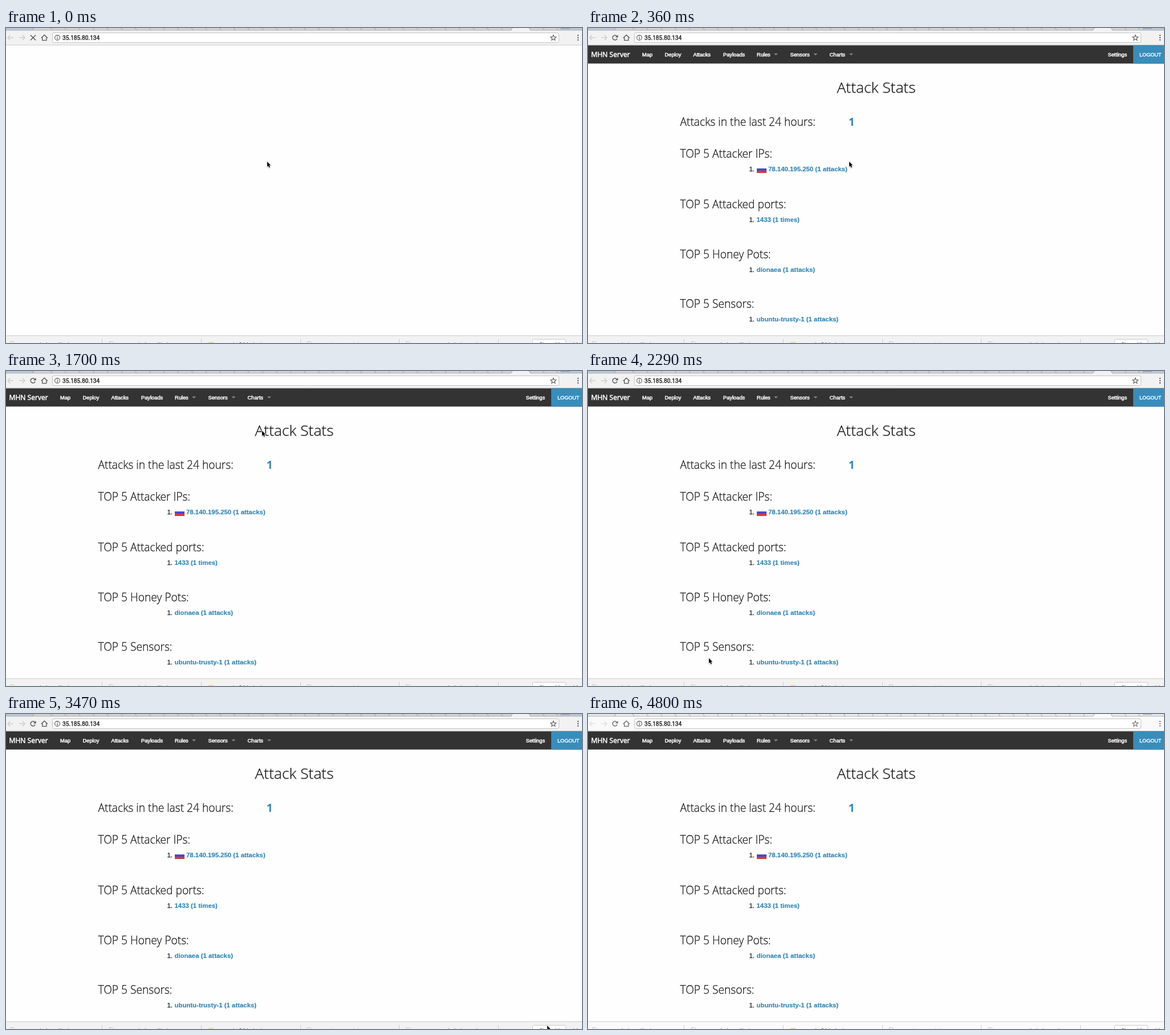
Animation of 1010x554 px, one loop 4900 ms. Source, as an HTML page with a canvas:

```html
<!DOCTYPE html>
<html lang="en">
<head>
<meta charset="utf-8">
<title>Attack Stats</title>
<style>
  html, body { margin: 0; width: 100%; height: 100%; overflow: hidden; background: #fefefe; }
  canvas { display: block; width: 1010px; height: 554px; }
</style>
</head>
<body>
<canvas id="stage" width="1010" height="554"></canvas>
<script>
const ctx = document.getElementById('stage').getContext('2d');
const W = 1010, H = 554, LOOP = 4900;
const LOADED = 150, PAGE_SHOWN = 360, BRIGHT = 4800;
const SANS = '"Liberation Sans", Arial, sans-serif';
const OPEN = '"Open Sans", sans-serif';
const UI = 'Roboto, sans-serif';
const LINK = '#2f84b5', INK = '#1c1c1c';

// time, x, y of the pointer tip; the pointer jumps from one spot to the next
const POINTER = [
  [0, 458, 235], [1260, 460, 235], [1410, 500, 213], [1560, 526, 155],
  [1700, 449, 105], [1850, 311, 86], [1990, 220, 129], [2140, 129, 220],
  [2290, 212, 505], [2440, 353, 527], [2590, 470, 443], [2730, 478, 324],
  [2880, 458, 233], [3030, 458, 231], [3180, 469, 230], [3320, 918, 548],
  [3470, 949, 548], [3760, 1002, 549], [3910, 994, 553], [4060, -50, -50]
];

function rect(x, y, w, h, color) {
  ctx.fillStyle = color;
  ctx.fillRect(x, y, w, h);
}

function text(str, x, y, font, color, weight = 0) {
  ctx.font = font;
  ctx.fillStyle = color;
  ctx.fillText(str, x, y);
  if (weight) {
    ctx.strokeStyle = color;
    ctx.lineWidth = weight;
    ctx.strokeText(str, x, y);
  }
}

function poly(points, closed) {
  ctx.beginPath();
  points.forEach(([x, y]) => ctx.lineTo(x, y));
  if (closed) ctx.closePath();
}

function line(points, color, width = 1, closed = false) {
  poly(points, closed);
  ctx.strokeStyle = color;
  ctx.lineWidth = width;
  ctx.stroke();
}

function shape(points, color) {
  poly(points, true);
  ctx.fillStyle = color;
  ctx.fill();
}

function box(x, y, w, h, r, fill, stroke) {
  ctx.beginPath();
  ctx.roundRect(x, y, w, h, r);
  ctx.fillStyle = fill;
  ctx.fill();
  ctx.strokeStyle = stroke;
  ctx.lineWidth = 1;
  ctx.stroke();
}

function circle(x, y, r, color, width) {
  ctx.beginPath();
  ctx.arc(x, y, r, 0, 7);
  if (width) {
    ctx.strokeStyle = color;
    ctx.lineWidth = width;
    ctx.stroke();
  } else {
    ctx.fillStyle = color;
    ctx.fill();
  }
}

function drawTabs(bright) {
  rect(0, 0, W, 4, bright ? '#ececec' : '#d2d2d2');
  const blue = bright ? '#e2e6ec' : '#bcc6d6';
  shape([[0, 0], [49, 0], [46, 4], [0, 4]], blue);
  shape([[972, 0], [W, 0], [W, 4], [970, 4]], blue);
  rect(973, 0, 16, 1.5, bright ? '#b9bdc4' : '#98a3b5');
  const edge = '#999';
  line([[49, 0], [46, 4]], edge);
  for (let i = 0; i < 33; i++) {
    const x = 80 + i * 24.69;
    line([[x - 2, 0], [x + 1.5, 4]], edge);
  }
  for (const x of [943, 967]) line([[x - 2, 0], [x + 1.5, 4]], edge);
  rect(0, 3.5, W, 1, '#b5b5b5');
  shape([[888, 0], [917, 0], [920, 5], [885, 5]], bright ? '#fafafa' : '#f2f2f2');
  line([[888, 0], [885, 4]], edge);
  line([[917, 0], [920, 4]], edge);
}

function arrow(x, dir, color) {
  line([[x - 5 * dir, 17], [x + 5 * dir, 17]], color, 1.3);
  line([[x + dir, 12.5], [x + 5 * dir, 17], [x + dir, 21.5]], color, 1.3);
}

function drawToolbar(loading, bright) {
  rect(0, 4, W, 26, bright ? '#fafafa' : '#f2f2f2');
  rect(0, 29.5, W, 1, '#cccccc');
  drawTabs(bright);
  const faint = bright ? '#dedede' : '#cbcbcb', dark = bright ? '#6c6c6c' : '#555';
  arrow(8, -1, faint);
  arrow(28, 1, faint);
  if (loading) {
    line([[43, 12.5], [52, 21.5]], dark, 1.5);
    line([[52, 12.5], [43, 21.5]], dark, 1.5);
  } else {
    ctx.beginPath();
    ctx.arc(47.3, 17, 4.1, 0.4, 5.5);
    ctx.strokeStyle = dark;
    ctx.lineWidth = 1.5;
    ctx.stroke();
    shape([[52.6, 12], [52.6, 16.5], [48, 16.5]], dark);
  }
  line([[61.7, 17.5], [67.3, 12.2], [72.9, 17.5]], dark, 1.3);
  line([[63.7, 16.5], [63.7, 21.6], [70.9, 21.6], [70.9, 16.5]], dark, 1.3);

  box(81.5, 8.5, 888, 17, 2.5, '#fff', '#c3c3c3');
  circle(90, 17, 4.4, '#555', 1.1);
  rect(89.4, 16.3, 1.3, 3.4, '#555');
  rect(89.4, 14, 1.3, 1.3, '#555');
  text('35.185.80.134', 99, 20.7, '10.2px ' + UI, '#1c1c1c', 0.35);

  const star = [];
  for (let i = 0; i < 10; i++) {
    const a = i * Math.PI / 5 - Math.PI / 2, r = i % 2 ? 2.3 : 5.2;
    star.push([959.8 + r * Math.cos(a), 17.3 + r * Math.sin(a)]);
  }
  line(star, dark, 1.1, true);
  for (const y of [13, 17, 21]) circle(1003, y, 1.25, bright ? '#888' : '#666');
}

function drawNav() {
  rect(0, 30.5, W, 32, '#333');
  rect(956, 30.5, 54, 32, '#398dbb');
  text('MHN Server', 5.5, 51, '12.1px ' + OPEN, '#fff', 0.5);
  const items = [['Map', 95], ['Deploy', 134.5], ['Attacks', 184.5], ['Payloads', 237],
    ['Rules', 296], ['Sensors', 354.5], ['Charts', 423.5], ['Settings', 911.5]];
  for (const [label, x] of items) text(label, x, 50, '9.3px ' + SANS, '#fff', 0.5);
  text('LOGOUT', 967, 50, '9.1px ' + SANS, '#fff', 0.4);
  for (const x of [326, 395.5, 458]) shape([[x, 44.7], [x + 7, 44.7], [x + 3.5, 48.3]], '#858585');
}

function heading(str, x, y, size) {
  text(str, x, y, `300 ${size}px ${OPEN}`, INK, 0.3);
}

function drawSection(title, y, entry, x = 295.5) {
  heading(title, 161.5, y, 19.2);
  text('1.', 282.5, y + 24.2, '11.4px ' + SANS, INK, 0.25);
  text(entry, x, y + 24.2, 'bold 11.4px ' + SANS, LINK, 0.15);
}

function drawPage() {
  drawNav();
  heading('Attack Stats', 436.5, 114, 26.4);
  heading('Attacks in the last 24 hours:', 161.5, 171.8, 19.2);
  text('1', 456.7, 171.8, 'bold 19.2px ' + OPEN, LINK);
  drawSection('TOP 5 Attacker IPs:', 227.8, '78.140.195.250 (1 attacks)', 316);
  drawSection('TOP 5 Attacked ports:', 316.5, '1433 (1 times)');
  drawSection('TOP 5 Honey Pots:', 404.5, 'dionaea (1 attacks)');
  drawSection('TOP 5 Sensors:', 492.2, 'ubuntu-trusty-1 (1 attacks)');
  rect(296, 244, 17, 11, '#e8e8e8');
  rect(296.5, 244, 16, 3, '#fdfdfd');
  rect(296, 247, 17, 4, '#4f46c8');
  rect(296, 251, 17, 4, '#d03c3a');
}

function drawShelf(bright) {
  rect(0, 541, W, 13, bright ? '#fafafa' : '#f2f2f2');
  rect(0, 540.5, W, 1, '#cccccc');
  const files = ['sensor-hub-audit.zip', 'sensor-hub-audit.zip', 'sample 24 hub.zip',
    'report-scan-a.txt', 'server-sample-hub-mask.png'];
  files.forEach((name, i) => {
    const x = 8 + i * 173.5;
    if (i === 2) rect(x, 552.5, 9, 1.5, '#f0cd8a');
    else line([[x, 554], [x, 551.5], [x + 5, 551.5], [x + 7.5, 554]], '#c4c4c4');
    text(name, x + 18, 560.6, '10px ' + UI, '#444');
    rect(168 + Math.round(i * 173.75), 547, 1, 7, '#cdcdcd');
  });
  box(923.5, 547.5, 58, 16, 2, '#fff', '#c9c9c9');
  text('Show All', 935, 560, '9.6px ' + UI, '#444');
  line([[995, 553], [1002, 560]], '#888', 1.2);
  line([[1002, 553], [995, 560]], '#888', 1.2);
}

function drawPointer(t) {
  const [, x, y] = POINTER.findLast(p => p[0] <= t);
  ctx.save();
  ctx.translate(x, y);
  const body = [[0, 0], [0, 9], [2, 7.2], [3.4, 10.5], [5, 9.8], [3.6, 6.6], [6.2, 6.4]];
  ctx.lineJoin = 'round';
  ctx.shadowColor = 'rgba(0,0,0,.35)';
  ctx.shadowBlur = 1.5;
  ctx.shadowOffsetY = 0.6;
  line(body, '#fff', 1.6, true);
  ctx.shadowColor = 'transparent';
  shape(body, '#000');
  ctx.restore();
}

function draw(t) {
  const bright = t >= BRIGHT;
  rect(0, 0, W, H, '#fefefe');
  drawToolbar(t < LOADED, bright);
  if (t >= PAGE_SHOWN) drawPage();
  drawShelf(bright);
  drawPointer(t);
}

const start = performance.now();
function tick() {
  draw((performance.now() - start) % LOOP);
  requestAnimationFrame(tick);
}
tick();
</script>
</body>
</html>
```
